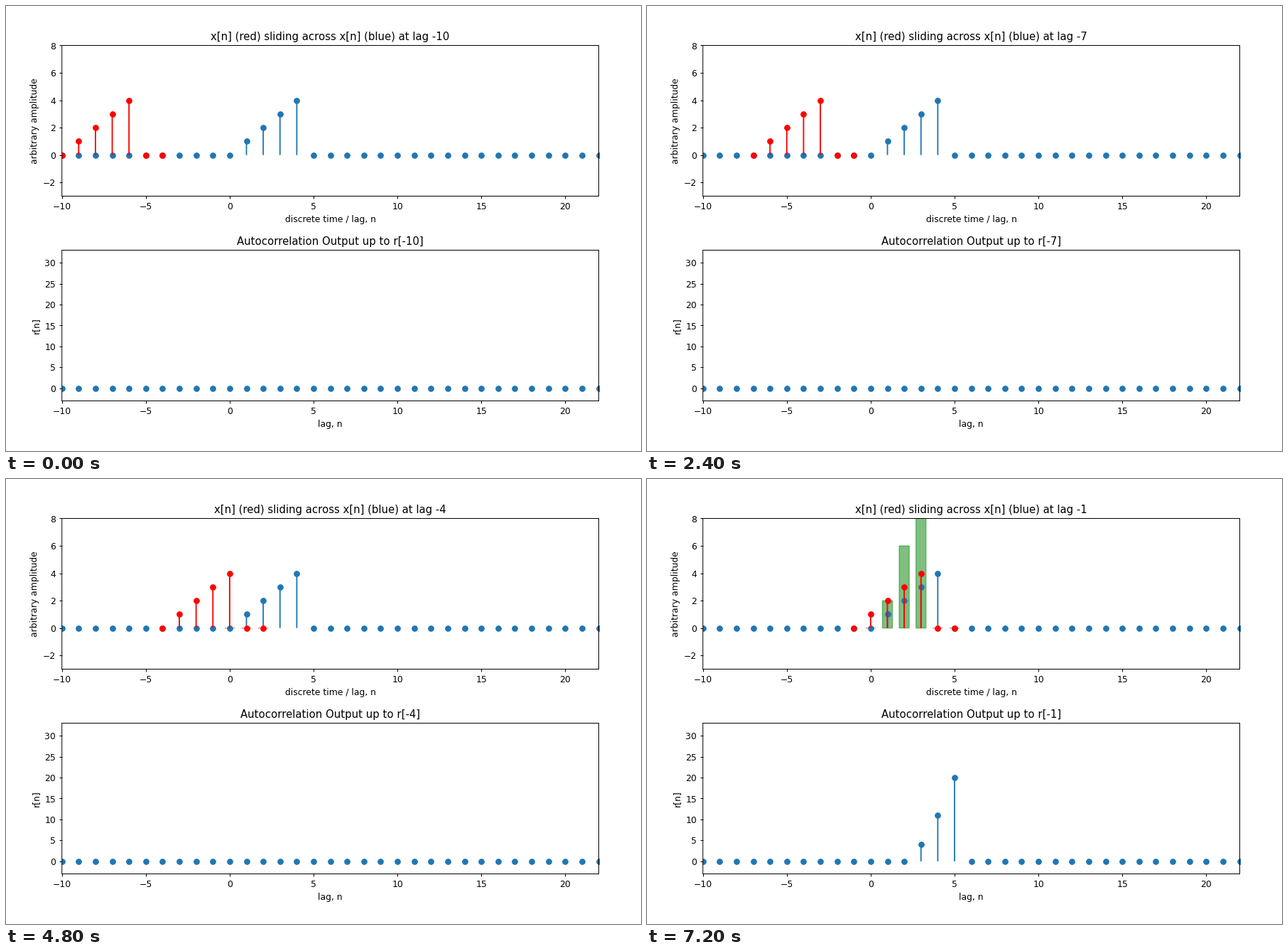
Animation of 894 by 626 pixels, one loop 8 s. Source, as a matplotlib script:

```python
import matplotlib.pyplot as plt
import numpy as np
from matplotlib.animation import FuncAnimation
from matplotlib.patches import Rectangle

W, H, DPI = 894, 626, 89.4
FIRST_LAG, FRAMES, STEP_MS = -10, 10, 800
BAR_WIDTH = 0.6

x = np.array([0, 1, 2, 3, 4, 0, 0])
n = np.arange(-10, 23)
signal = np.zeros(n.size)
signal[10:10 + x.size] = x
r = np.correlate(x, x, "full")  # lags -6 .. 6

plt.rcParams["font.family"] = "DejaVu Sans"
plt.rcParams["path.snap"] = False
# the small margin keeps the pixel size from rounding down
fig = plt.figure(figsize=((W + 0.01) / DPI, (H + 0.01) / DPI), dpi=DPI,
                 facecolor="white")


def add_panel(top, bottom, left=78.7, right=834.5):
    return fig.add_axes([left / W, 1 - bottom / H,
                         (right - left) / W, (bottom - top) / H])


top_ax = add_panel(55.5, 267.5)
low_ax = add_panel(343.5, 555.5)


def stems(ax, pos, values, color):
    ax.stem(pos, values, linefmt=f"{color}-", markerfmt=f"{color}o", basefmt=" ")


def style(ax, title, xlabel, ylabel, ylim, yticks):
    ax.set(title=title, xlabel=xlabel, ylabel=ylabel, xlim=(-10, 22), ylim=ylim,
           xticks=range(-10, 21, 5), yticks=yticks)


def draw_sliding(lag):
    top_ax.cla()
    stems(top_ax, n, signal, "C0")
    stems(top_ax, np.arange(x.size) + lag, x, "r")
    # products exist only where both sequences are defined
    for pos in range(max(0, lag), min(x.size, x.size + lag)):
        product = x[pos] * x[pos - lag]
        top_ax.add_patch(Rectangle((pos - BAR_WIDTH / 2, 0), BAR_WIDTH, product,
                                   color="g" if product > 0 else "r", alpha=0.5))
    style(top_ax, f"x[n] (red) sliding across x[n] (blue) at lag {lag}",
          "discrete time / lag, n", "arbitrary amplitude", (-3, 8), range(-2, 9, 2))


def draw_output(lag):
    low_ax.cla()
    out = np.zeros(n.size)
    known = max(0, lag + x.size)
    out[10:10 + known] = r[:known]
    stems(low_ax, n, out, "C0")
    style(low_ax, f"Autocorrelation Output up to r[{lag}]",
          "lag, n", "r[n]", (-3, 33), range(0, 31, 5))


def update(frame):
    lag = FIRST_LAG + frame
    draw_sliding(lag)
    draw_output(lag)
    return []


anim = FuncAnimation(fig, update, frames=FRAMES, interval=STEP_MS,
                     init_func=lambda: [], repeat=True, repeat_delay=0, blit=False)

plt.show()
```
